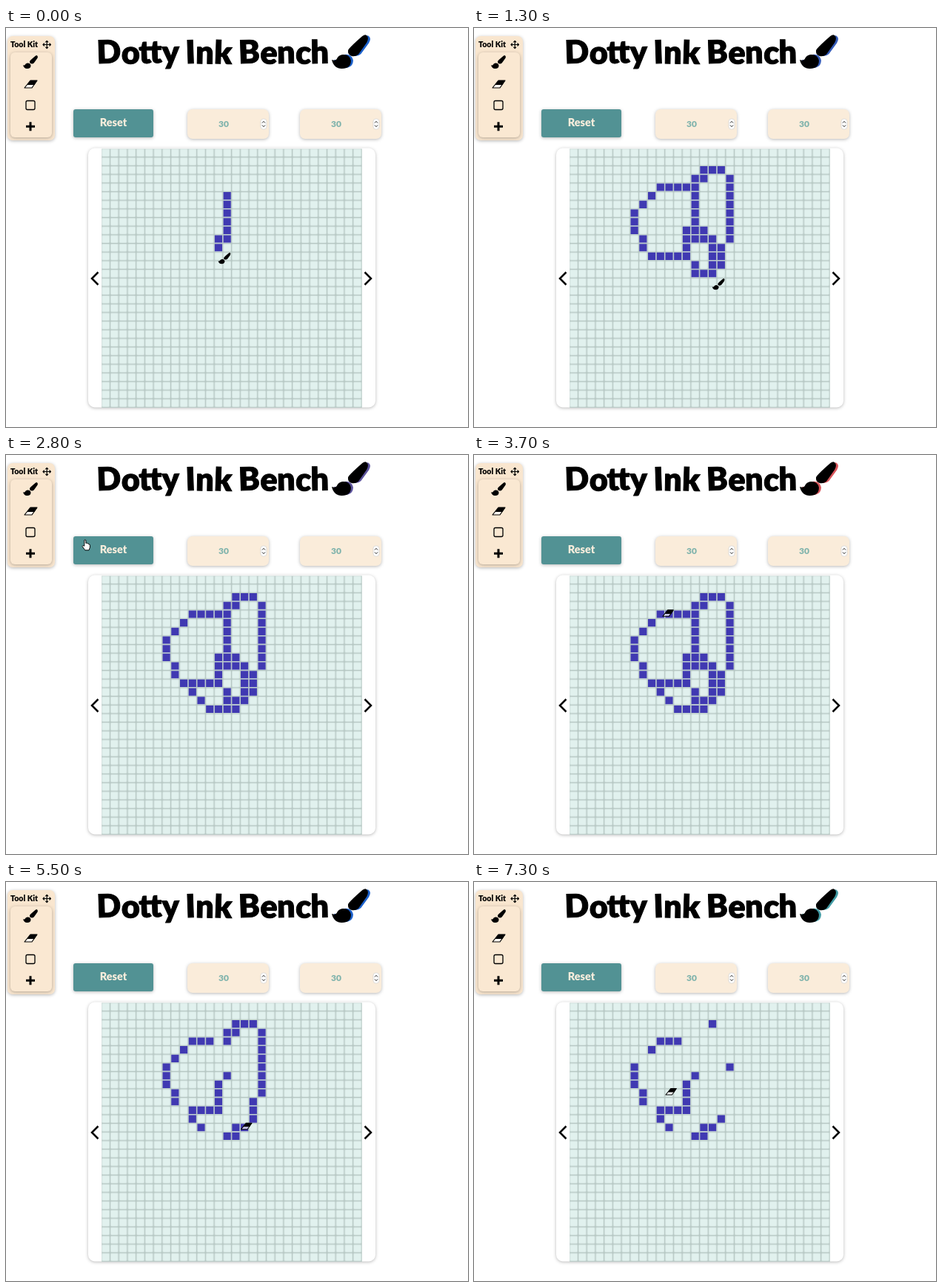
An HTML page for the animation above (7.4 s loop, 624 by 540 pixels).

```html
<!DOCTYPE html>
<html lang="en">
<head>
<meta charset="utf-8">
<title>Dotty Ink Bench</title>
<style>
  html, body { margin: 0; width: 100%; height: 100%; overflow: hidden; background: #fff; }
  svg { display: block; width: 624px; height: 540px; }
  text { font-family: Lato, "Open Sans", sans-serif; font-weight: 900; }
  .card { filter: drop-shadow(0 1.5px 2px rgba(0, 0, 0, .28)); }
  .line { fill: none; stroke: #000; stroke-linecap: round; stroke-linejoin: round; }
  .chevron { fill: none; stroke: #000; stroke-width: 2.5; }
</style>
</head>
<body>
<svg viewBox="0 0 624 540">
  <defs>
    <g id="brush">
      <path d="M49 1Q53 4 49 11L38 26Q34 30 28 29Q22 27 23 21Q25 17 43 2Q47-1 49 1Z"/>
      <path d="M15 27Q25 26 27 35Q27 46 14 46Q3 46 0 34Q5 36 7 33Q9 28 15 27Z"/>
    </g>
    <g id="eraser">
      <path d="M1 11L9 1H18L11 11Z" fill="#fff" fill-opacity=".7" stroke="#000" stroke-width="1.2" stroke-linejoin="round"/>
      <path d="M5 6L9 1H18L14.5 7H5Z"/>
    </g>
    <path id="hand" d="M3 6V1.5Q3 0 4 0T5.2 1.5V5Q7 4 7.5 5.5Q9 5 9.3 6.5Q11 6.3 11 8V11L9.5 15H4L0 9.5Q0 7.5 3 9Z"
      fill="#fff" stroke="#000" stroke-width="1"/>
    <path id="arrow" class="line" stroke-width="1.2" d="M0 0V-5M-1.5-3.7L0-5.2L1.5-3.7"/>
    <pattern id="grid" patternUnits="userSpaceOnUse" x="129.2" y="163.5" width="11.72" height="11.68">
      <rect width="12" height="12" fill="#b6c7c3"/>
      <rect x=".1" y=".1" width="10.7" height="10.5" rx="1.2" fill="#cfdfdc"/>
      <rect x=".7" y=".7" width="9.6" height="9.4" rx="1" fill="#e1f1ee"/>
    </pattern>
    <g id="field">
      <rect class="card" width="110" height="40" rx="7" fill="#faecda"/>
      <text x="49" y="24" font-size="12" fill="#7fb3ac" text-anchor="middle">30</text>
      <rect x="99" y="13" width="8" height="14" rx="3.5" fill="#fff" stroke="#ccc" stroke-width=".6"/>
      <path class="line" d="M101.2 18.3L103 16.3L104.8 18.3M101.2 21.7L103 23.7L104.8 21.7" stroke-width=".8"/>
    </g>
  </defs>

  <rect width="624" height="540" fill="#fff"/>
  <text x="123" y="48" font-size="43" stroke="#000" stroke-width="1" rotate="-2 2 -2 3 -1 0 -2 1 2 0 -2 2 -1 2 -1">Dotty Ink Bench</text>
  <use href="#brush" id="glow" transform="translate(443 10) scale(.96)"/>
  <use href="#brush" transform="translate(440 9) scale(.96 1)"/>

  <rect class="card" x="2" y="11" width="64" height="141" rx="7" fill="#f9e6cf"/>
  <rect class="card" x="6" y="33" width="56" height="115" rx="6" fill="#fae8d2"/>
  <text x="6" y="26" font-size="10.6">Tool Kit</text>
  <g transform="translate(55.2 22.5)">
    <use href="#arrow"/>
    <use href="#arrow" transform="rotate(90)"/>
    <use href="#arrow" transform="rotate(180)"/>
    <use href="#arrow" transform="rotate(270)"/>
  </g>
  <use href="#brush" transform="translate(23 37) scale(.39)"/>
  <use href="#eraser" x="24" y="70"/>
  <rect class="line" x="27" y="98.5" width="12" height="12" rx="2" stroke-width="1.3"/>
  <path d="M27 133.2H39M33 127.2V139.2" stroke="#000" stroke-width="3"/>

  <rect class="card" x="91" y="110" width="108" height="38" rx="3" fill="#529294"/>
  <text x="145" y="133" font-size="14.5" fill="#f9eddc" text-anchor="middle">Reset</text>
  <use href="#field" x="245" y="110"/>
  <use href="#field" x="397" y="110"/>

  <rect class="card" x="111" y="162.5" width="388" height="351" rx="9" fill="#fff"/>
  <rect x="129.2" y="163.5" width="351.6" height="350.4" fill="url(#grid)"/>
  <path class="chevron" d="M124.5 330.5L116 339L124.5 347.5M484.500 330.500L493 339L484.500 347.500"/>
  <path id="ink" fill="#4039b2"/>
  <use id="cursor"/>
</svg>
<script>
const LOOP = 7400, STEP = 100;
const LEFT = 129.2, TOP = 163.5, COL = 11.72, ROW = 11.68;
const MENU = [42, 82], START = [262, 214];
const BLUE = "#1d62cc", PURPLE = "#5b55a0", RED = "#d9565c", TEAL = "#47a3a0";
const palette = [BLUE, BLUE, PURPLE, PURPLE, RED, BLUE, BLUE, BLUE, TEAL];

const $ = id => document.getElementById(id);
const mix = (a, b, p) => a + (b - a) * p;
const progress = (t, from, to) => Math.min(1, Math.max(0, (t - from) / (to - from)));

// Every cell on the way along the corners, written "col,row col,row".
function trace(path) {
  const corners = path.split(" ").map(p => p.split(",").map(Number));
  const cells = [corners[0]];
  corners.slice(1).forEach(([c1, r1], i) => {
    const [c0, r0] = corners[i];
    const n = Math.max(Math.abs(c1 - c0), Math.abs(r1 - r0));
    for (let k = 1; k <= n; k++)
      cells.push([Math.round(mix(c0, c1, k / n)), Math.round(mix(r0, r1, k / n))]);
  });
  return cells;
}
const stroke = (from, to, path, paint) => ({ from, to, paint, cells: trace(path) });
const paint = (from, to, path) => stroke(from, to, path, true);
const erase = (from, to, path) => stroke(from, to, path, false);

const strokes = [
  paint(-150, 700, "14,5 14,10 13,10 13,12 9,12 7,9 7,7 10,4 14,4 14,3 15,3 15,2 17,2 18,3 18,10 17,11 17,13 14,14 14,13"),
  paint(800, 1600, "13,9 15,9 15,10 16,10 16,14 15,15 12,15 10,13"),
  erase(3700, 4700, "12,3 14,5 14,7 15,8 15,10 14,14 12,15 10,14"),
  erase(4700, 5500, "10,14 9,13 9,8 13,8 14,9 14,10 16,10 16,13"),
  erase(5500, 7300, "16,13 17,12 17,11 18,10 18,8 19,7 18,6 18,3 16,1 14,3 15,3 14,4 8,6 11,9")
];

function glowAt(t) {
  const f = t / LOOP * (palette.length - 1), i = Math.floor(f);
  return `color-mix(in srgb, ${palette[i + 1]} ${(f - i) * 100}%, ${palette[i]})`;
}

// Replay the strokes up to time t: painted cells and the tool's last cell.
function replay(t) {
  const filled = new Map();
  let last;
  for (const s of strokes.filter(s => t >= s.from)) {
    const n = Math.round(s.cells.length * progress(t, s.from, s.to));
    for (const cell of s.cells.slice(0, n)) {
      if (s.paint) filled.set(cell.join(), cell);
      else filled.delete(cell.join());
    }
    last = s.cells[Math.max(0, n - 1)];
  }
  return { cells: [...filled.values()], last };
}

// The pointer visits the tool kit between painting and erasing.
function pointerAt(t, [col, row], [dx, dy]) {
  const pos = [LEFT + col * COL + dx, TOP + row * ROW + dy];
  const glide = (a, b, p) => a.map((v, i) => mix(v, b[i], p));
  if (t <= 1600 || t > 3700) return pos;
  return t < 2500 ? glide(pos, MENU, progress(t, 1600, 1800))
    : glide(MENU, START, progress(t, 2500, 3500));
}

function draw(time) {
  const t = Math.floor((time % LOOP) / STEP) * STEP;
  const { cells, last } = replay(t);
  $("ink").setAttribute("d", cells.map(([c, r]) =>
    `M${(LEFT + c * COL + .3).toFixed(2)} ${(TOP + r * ROW + .2).toFixed(2)}h10.2v10.1h-10.2z`).join(""));
  $("glow").style.fill = glowAt(t);

  const erasing = t > 2000;
  const [x, y] = pointerAt(t, last, erasing ? [8, 15] : [13, 20]);
  const [name, dx, dy, size] = x < LEFT ? ["hand", 5, 7, .95]
    : erasing ? ["eraser", 8, 5, .85] : ["brush", 8, 8, .33];
  $("cursor").setAttribute("href", "#" + name);
  $("cursor").setAttribute("transform", `translate(${x - dx} ${y - dy}) scale(${size})`);
}

const began = performance.now();
function tick() {
  draw(performance.now() - began);
  requestAnimationFrame(tick);
}
tick();
</script>
</body>
</html>
```
